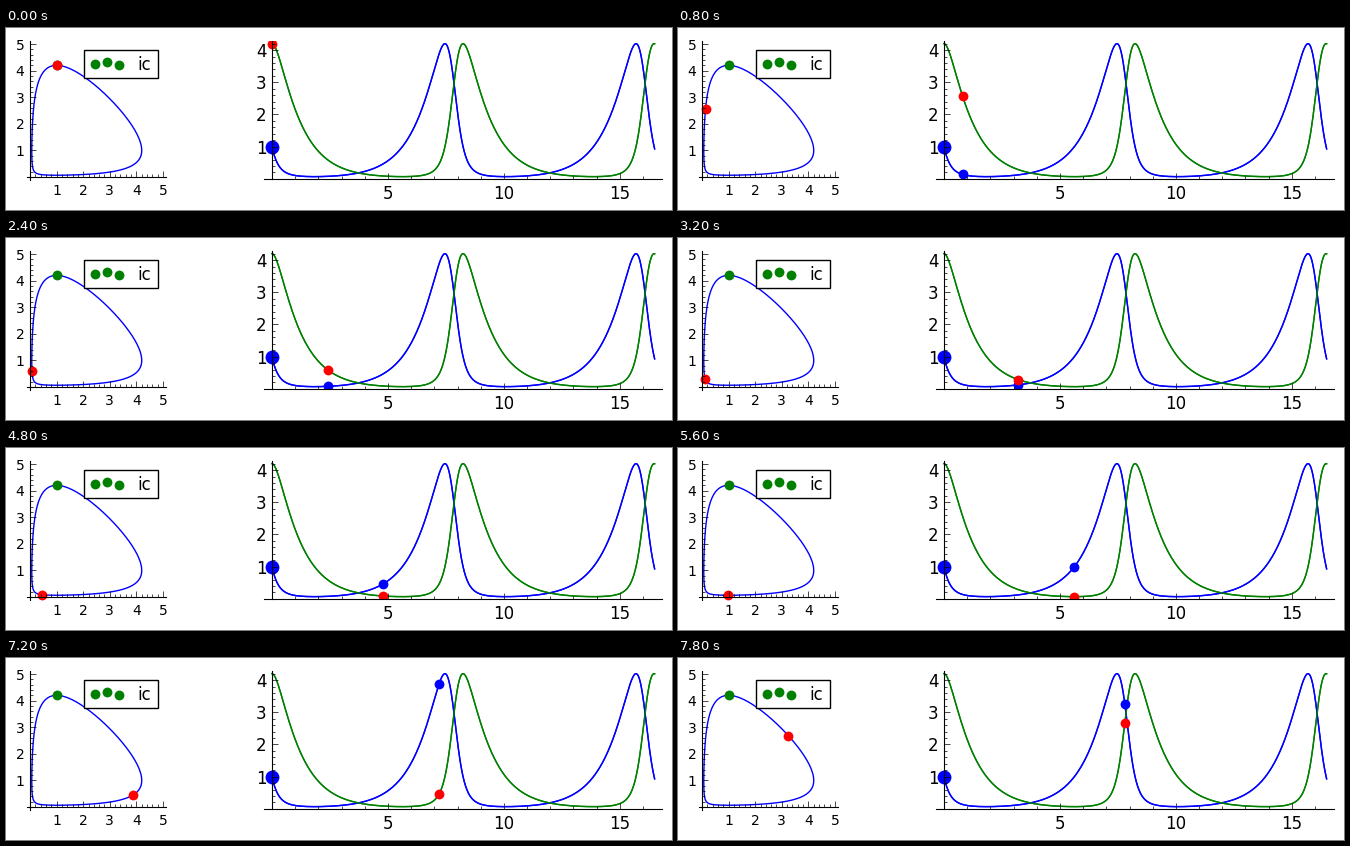
A matplotlib script that plays this animation: 666 px wide and 182 px high, repeating every 8 s.

```python
import numpy as np
import matplotlib.pyplot as plt
from matplotlib.animation import FuncAnimation
from matplotlib.patches import Rectangle
from matplotlib.ticker import AutoMinorLocator, FuncFormatter, MultipleLocator

W, H, DPI = 666, 182, 100
FRAMES, INTERVAL = 40, 200
DT, T_END, T_STEP = 0.01, 16.5, 0.2
PERIOD = T_END / 2
START = (1.0, 4.2)
SMALL, LARGE = 50, 100

plt.rcParams["font.family"] = "DejaVu Sans"


def flow(p):
    """Predator-prey equations."""
    x, y = p
    return np.array([x * (1 - y), y * (x - 1)])


def solve():
    """Integrate the orbit with fourth-order Runge-Kutta."""
    path = [np.array(START)]
    for _ in range(round(T_END / DT)):
        p = path[-1]
        a = flow(p)
        b = flow(p + DT / 2 * a)
        c = flow(p + DT / 2 * b)
        d = flow(p + DT * c)
        path.append(p + DT / 6 * (a + 2 * b + 2 * c + d))
    return np.array(path).T


def add_axes(left, top, right, bottom, xlim, ylim, xstep, size, xpad):
    """Axes placed by pixel edges, with both spines crossing at zero."""
    ax = fig.add_axes([left / W, 1 - bottom / H,
                       (right - left) / W, (bottom - top) / H])
    ax.set(xlim=xlim, ylim=ylim)
    ax.patch.set_visible(False)
    ax.set_axisbelow(False)
    for side in ("top", "right"):
        ax.spines[side].set_visible(False)
    for side in ("left", "bottom"):
        ax.spines[side].set_position(("data", 0))
        ax.spines[side].set_linewidth(0.8)
    for axis, step in ((ax.xaxis, xstep), (ax.yaxis, 1)):
        axis.set_major_locator(MultipleLocator(step))
        axis.set_minor_locator(AutoMinorLocator(5))
        axis.set_major_formatter(
            FuncFormatter(lambda v, _: f"{v:.0f}" if v > 0.5 else ""))
    ax.tick_params(which="both", direction="in", width=0.5)
    ax.tick_params(which="major", length=4, pad=4, labelsize=size)
    ax.tick_params(which="minor", length=2)
    ax.tick_params(axis="x", which="major", pad=xpad)
    return ax


def dot(ax, x, y, color, size=SMALL, z=2.1):
    """Marker above the curves but below spines, ticks and labels."""
    return ax.scatter([x], [y], s=size, c=color, linewidths=0, zorder=z)


def draw_legend():
    ax = fig.add_axes([0, 0, 1, 1])
    ax.set(xlim=(0, W), ylim=(H, 0))
    ax.axis("off")
    ax.add_patch(Rectangle((78, 22), 74, 28, fc="white", ec="black", lw=1))
    for x, y in ((89.2, 35.8), (100.8, 34.4), (112.5, 36.7)):
        dot(ax, x, y, "green")
    ax.text(131.5, 42, "ic", fontsize=12, va="baseline")


fig = plt.figure(figsize=(W / DPI, H / DPI), dpi=DPI, facecolor="white")
t = np.arange(round(T_END / DT) + 1) * DT
x, y = solve()

phase = add_axes(21.3, 13.4, 159.7, 151.7,
                 (-0.1, 5.1), (-0.1, 5.1), 1, 10, 4.8)
once = t <= PERIOD
phase.plot(x[once], y[once], "b", lw=1)
dot(phase, *START, "green")

pad_t, pad_y = 0.02 * T_END, 0.02 * np.ptp(y)
series = add_axes(258.3, 13, 656.3, 151.3, (-pad_t, T_END + pad_t),
                  (y.min() - pad_y, y.max() + pad_y), 5, 12, 4.5)
# Two passes give the bolder stroke of the time curves.
for _ in range(2):
    series.plot(t, x, "b", t, y, "g", lw=1)
dot(series, 0, START[0], "blue", LARGE)

draw_legend()

state = dot(phase, *START, "red", z=2.2)
prey = dot(series, 0, START[0], "blue", z=2.2)
predator = dot(series, 0, START[1], "red", z=2.3)


def update(frame):
    i = round(frame * T_STEP / DT)
    state.set_offsets([[x[i], y[i]]])
    prey.set_offsets([[t[i], x[i]]])
    predator.set_offsets([[t[i], y[i]]])
    return state, prey, predator


anim = FuncAnimation(fig, update, frames=FRAMES, interval=INTERVAL,
                     repeat=True, repeat_delay=0)
plt.show()
```
